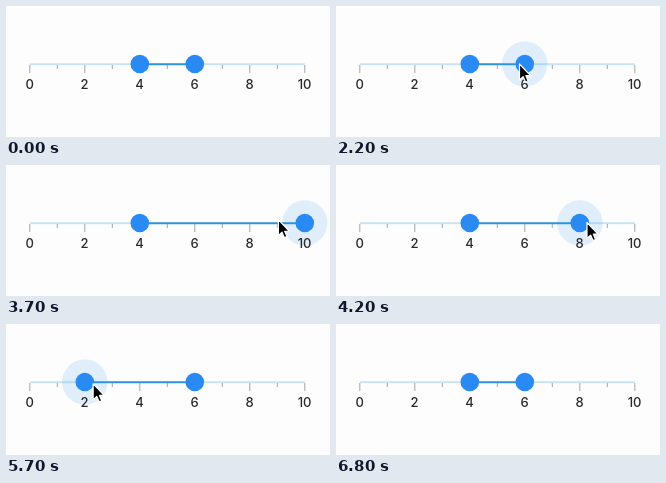
Animation of 324 by 131 pixels, one loop 7400 ms. Source, as an HTML page:

```html
<!DOCTYPE html>
<html lang="en">
<head>
<meta charset="utf-8">
<title>Range slider</title>
<style>
  html, body { margin: 0; width: 100%; height: 100%; overflow: hidden; background: #fefdfe; }
  svg { display: block; width: 324px; height: 131px; }
  text { font: 500 13px Inter, Roboto, sans-serif; fill: #2a2a2c; text-anchor: middle; }
  .thumb { fill: #2a8af3; }
  .halo { fill: #2a95e8; opacity: .14; }
  .ticks { stroke: #a2a4a8; stroke-width: 1; }
</style>
</head>
<body>
<svg viewBox="0 0 324 131">
  <rect x="23.8" y="57.3" width="275" height="1.9" fill="#c5e3f3"/>
  <g class="ticks" id="ticks"></g>
  <rect id="active" y="57.3" height="1.9" fill="#2b94dd"/>
  <circle class="halo" id="halo" cy="58" r="22.7"/>
  <circle class="thumb" id="low" cy="58" r="9.3"/>
  <circle class="thumb" id="high" cy="58" r="9.3"/>
  <g id="labels"></g>
  <path id="cursor" d="M0 0V16L3.6 12.6L6 18L8.6 17L6.3 11.6H11Z"
        fill="#000" stroke="#fff" stroke-width="1.2" stroke-linejoin="round"/>
</svg>
<script>
const LOOP = 7400, STEP = 100, GRAB = 4;
const $ = id => document.getElementById(id);
const toX = value => 23.8 + value * 27.5;
const snap = x => 2 * Math.round((x - toX(0)) / 55);
const ease = k => k * k * (3 - 2 * k);

// Pointer strokes: each eases from the previous end point to (x, y)
const entry = { x: 246, y: 67 };
const strokes = [
  { from: 300, to: 900, x: 183.5, y: 58 },
  { from: 2300, to: 2700, x: 222, y: 45 },
  { from: 3300, to: 3900, x: 290, y: 58 },
  { from: 4000, to: 4200, x: 251, y: 57.5 },
  { from: 4600, to: 5900, x: 76, y: 60 },
  { from: 6000, to: 6200, x: 133.5, y: 60 },
  { from: 6400, to: 6700, x: 151, y: 20 }
];
const presses = [
  { thumb: 'high', from: 2200, to: 5100 },
  { thumb: 'low', from: 5600, to: 6500 }
];

function pointer(t) {
  let { x, y } = entry;
  for (const s of strokes) {
    const k = ease(Math.min(1, Math.max(0, (t - s.from) / (s.to - s.from))));
    x += (s.x - x) * k;
    y += (s.y - y) * k;
  }
  return { x, y };
}

function addSvg(parent, tag, attrs, text = '') {
  const el = document.createElementNS('http://www.w3.org/2000/svg', tag);
  for (const name in attrs) el.setAttribute(name, attrs[name]);
  el.textContent = text;
  parent.append(el);
}

for (let v = 0; v <= 10; v++) {
  const x = toX(v), major = v % 2 === 0;
  addSvg($('ticks'), 'line', { x1: x, x2: x, y1: 59, y2: major ? 67 : 63 });
  if (major) addSvg($('labels'), 'text', { x: x - 0.2, y: 82.5 }, v);
}

function draw(t) {
  const pos = pointer(t);
  const press = presses.find(p => t >= p.from && t < p.to);
  const value = { low: 4, high: 6 };
  if (press) value[press.thumb] = snap(pos.x + GRAB);

  const low = toX(value.low), high = toX(value.high);
  $('low').setAttribute('cx', low);
  $('high').setAttribute('cx', high);
  $('active').setAttribute('x', low);
  $('active').setAttribute('width', high - low);

  $('halo').style.display = press ? '' : 'none';
  if (press) $('halo').setAttribute('cx', toX(value[press.thumb]));

  $('cursor').style.display = t >= 300 && t < 6800 ? '' : 'none';
  $('cursor').setAttribute('transform', `translate(${pos.x} ${pos.y})`);
}

const start = performance.now();
function tick() {
  const t = (performance.now() - start) % LOOP;
  draw(Math.floor(t / STEP) * STEP);
  requestAnimationFrame(tick);
}
tick();
</script>
</body>
</html>
```
